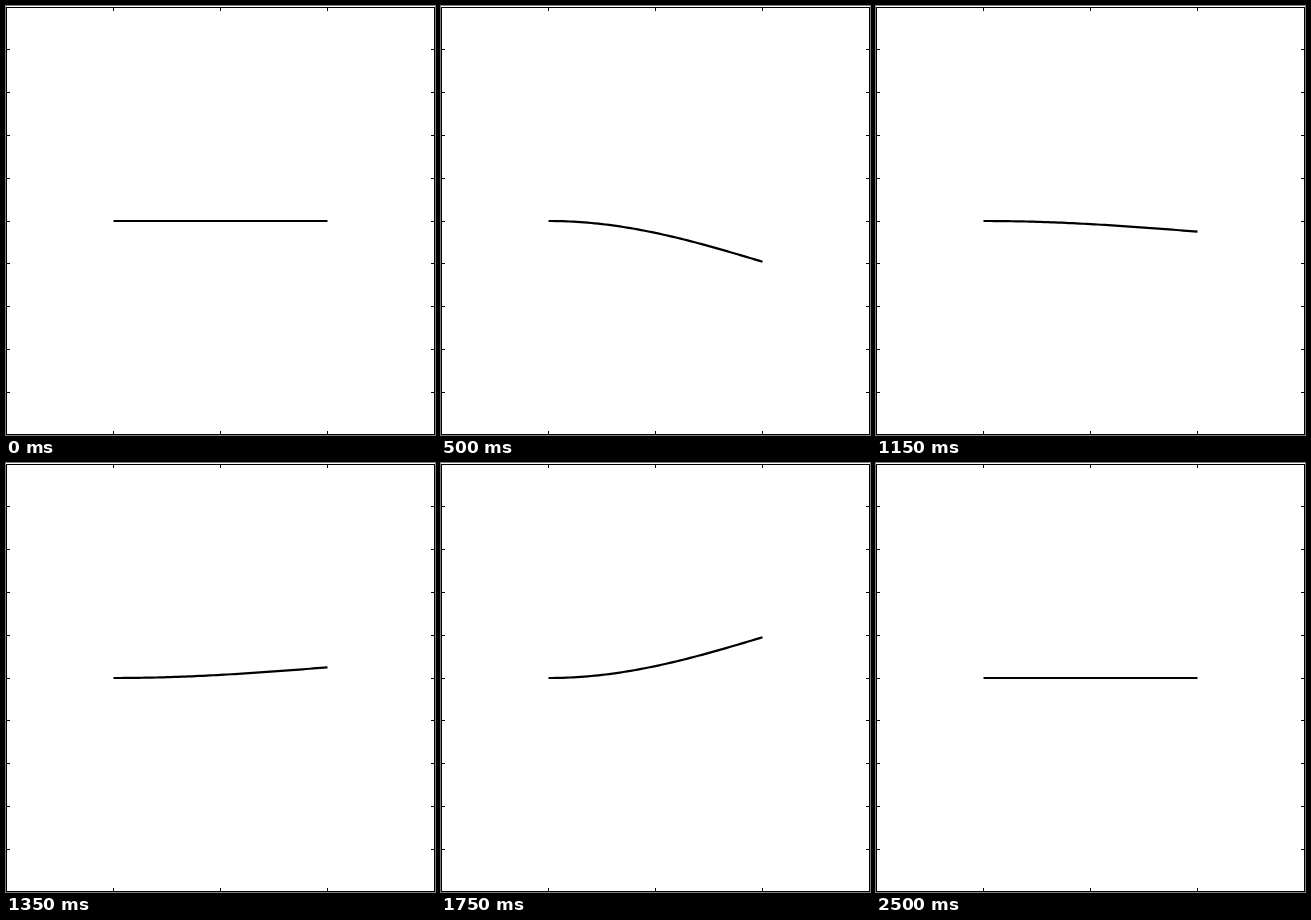
Recreate the animation shown at these times as an HTML page. Size 429 by 429 pixels, loop 2.55 s.

```html
<!DOCTYPE html>
<html lang="en">
<head>
<meta charset="utf-8">
<title>Vibrating cantilever</title>
<style>
  html, body { margin: 0; width: 100%; height: 100%; overflow: hidden; background: #fff; }
  svg { display: block; width: 429px; height: 429px; }
  path { fill: none; stroke: #000; }
  #axes { stroke-width: 1; shape-rendering: crispEdges; }
  #beam { stroke-width: 2.2; stroke-linejoin: round; }
</style>
</head>
<body>
<svg viewBox="0 0 429 429">
  <path id="axes"/>
  <path id="beam"/>
</svg>
<script>
  const STEP = 50, STEPS = 51;
  const LEFT = 107.5, LENGTH = 214, REST = 215, AMPLITUDE = 42.8;
  const TICK = 4, SEGMENTS = 60;
  const beam = document.getElementById('beam');

  function axesPath() {
    let d = 'M.5 1.5H428.5V428.5H.5Z';
    for (let i = 1; i < 4; i++) {
      const x = 107 * i + 0.5;
      d += `M${x} 1v${TICK}M${x} 429v${-TICK}`;
    }
    for (let i = 1; i < 10; i++) {
      const y = Math.round(0.6 + 42.8 * i) + 0.5;
      d += `M0 ${y}h${TICK}M429 ${y}h${-TICK}`;
    }
    return d;
  }

  // Clamped at the left: deflection follows 1 - cos(pi s / 2)
  function beamPath(tip) {
    const points = [];
    for (let i = 0; i <= SEGMENTS; i++) {
      const s = i / SEGMENTS;
      const y = REST + tip * (1 - Math.cos(Math.PI * s / 2));
      points.push(`${(LEFT + LENGTH * s).toFixed(2)} ${y.toFixed(3)}`);
    }
    return 'M' + points.join('L');
  }

  const start = performance.now();
  function draw() {
    const elapsed = Math.max(0, performance.now() - start);
    const k = Math.floor(elapsed / STEP) % STEPS;
    const phase = 2 * Math.PI * k / (STEPS - 1);
    beam.setAttribute('d', beamPath(AMPLITUDE * Math.sin(phase)));
    requestAnimationFrame(draw);
  }

  document.getElementById('axes').setAttribute('d', axesPath());
  draw();
</script>
</body>
</html>
```
